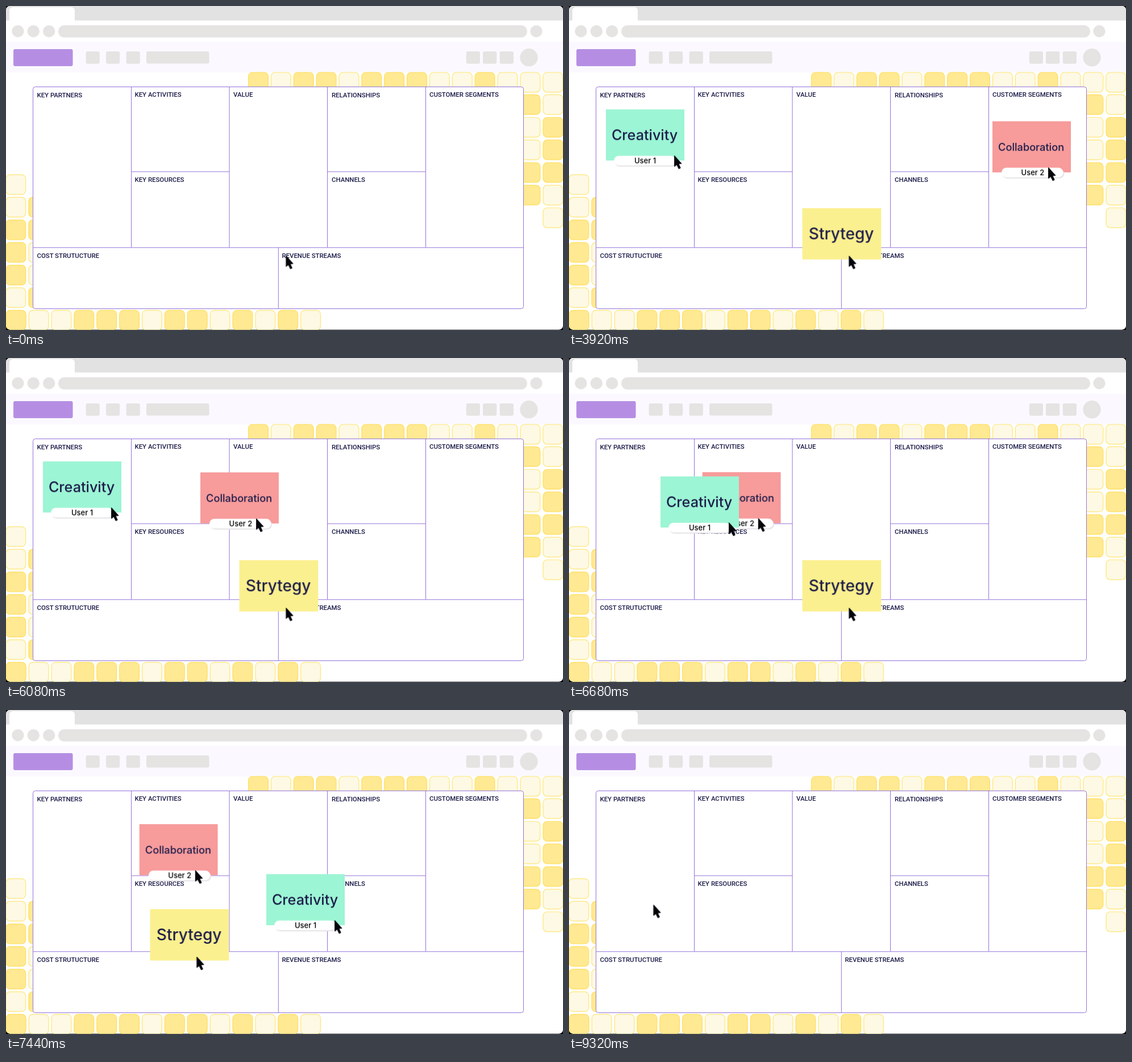
Animation of 980x571 px, one loop 9920 ms. Source, as an HTML page:

```html
<!DOCTYPE html>
<html lang="en">
<head>
<meta charset="utf-8">
<title>Canvas collaboration</title>
<style>
  html, body { margin: 0; width: 100%; height: 100%; overflow: hidden; background: #000; }
  svg { display: block; width: 980px; height: 571px; }
  .chrome { fill: #e6e3e3; }
  .lines { fill: none; stroke: #9473da; stroke-width: 1; }
  .heads { font: 500 11.4px Roboto, sans-serif; fill: #1b1b49; }
  .word { font-family: Inter, sans-serif; font-weight: 500; fill: #1b1b49; text-anchor: middle; }
  .user { font: 500 13px Inter, sans-serif; fill: #000; text-anchor: middle; }
</style>
</head>
<body>
<svg viewBox="0 0 980 571">
  <defs>
    <clipPath id="win"><rect width="980" height="570.4" rx="7"/></clipPath>
    <path id="cursor" d="M.6.6V19.6L4.6 16.4L8.2 23.6L11.2 22.2L7.9 14.9L13 14.4Z"
      fill="#05050c" stroke="#05050c" stroke-width="1" stroke-linejoin="round"/>
  </defs>
  <g clip-path="url(#win)">
    <rect width="980" height="571" fill="#fff"/>
    <rect width="980" height="25.5" fill="#e2e2e2"/>
    <path d="M6 26V8a6 6 0 0 1 6-6H115a6 6 0 0 1 6 6V26Z" fill="#fff"/>
    <rect y="62.5" width="980" height="54.5" fill="#fbf9ff"/>
    <g class="chrome" id="chrome">
      <rect x="92" y="34" width="825" height="21.5" rx="10.5"/>
      <rect x="247" y="80" width="110.5" height="21.5" rx="3"/>
      <circle cx="920" cy="90.8" r="15.7"/>
    </g>
    <rect x="13" y="76" width="104.5" height="30" rx="3" fill="#b58ee3"/>
    <g id="tiles" stroke-width="1.2"></g>
    <rect x="47.5" y="142.5" width="863" height="391" rx="4" fill="#fff"/>
    <path class="lines" d="M220.5 142.5V425.5M393 142.5V425.5M565.5 142.5V425.5M738.5 142.5V425.5
      M47.5 425.8H910.5M479.3 425.5V533.5M220.5 292H393M565.5 292H738.5"/>
    <rect class="lines" x="47.5" y="142.5" width="863" height="391" rx="4"/>
    <g class="heads" id="heads"></g>
    <g id="notes"></g>
  </g>
</svg>
<script>
const LOOP = 9920, FRAME = 40;
const $ = id => document.getElementById(id);

function add(parent, tag, attrs, text) {
  const el = document.createElementNS('http://www.w3.org/2000/svg', tag);
  for (const k in attrs) el.setAttribute(k, attrs[k]);
  if (text) el.textContent = text;
  return parent.appendChild(el);
}

// Browser buttons
for (const cx of [21, 48.3, 75.7, 933]) add($('chrome'), 'circle', { cx, cy: 44.6, r: 10.6 });
for (const x of [140.5, 176, 211.5, 809.7, 839, 868.7])
  add($('chrome'), 'rect', { x, y: 80, width: 24.3, height: 21.7, rx: 3 });

// Tile runs: D = deep, L = light
function tiles(x, y, dx, dy, run) {
  [...run].forEach((c, i) => add($('tiles'), 'rect', {
    x: x + dx * i, y: y + dy * i, width: 34.8, height: 34.8, rx: 7,
    fill: c === 'D' ? '#ffe992' : '#fdf9e4',
    stroke: c === 'D' ? '#ffde5c' : '#ffe676'
  }));
}
const PITCH = 39.87;
tiles(426.5, 117, PITCH, 0, 'DLDDLDDDLLDLLL');
tiles(905, 156.4, 0, PITCH, 'DLLDD');
tiles(945, 156.4, 0, PITCH, 'LDDDLL');
tiles(-.1, 297.3, 0, PITCH, 'LLDDDL');
tiles(39.9, 337.2, 0, PITCH, 'DDLLD');
tiles(.3, 536.3, PITCH, 0, 'DLLDDDLDDLDLDL');

const heads = [
  ['KEY PARTNERS', 54.5, 161], ['KEY ACTIVITIES', 226.5, 160], ['VALUE', 400, 160],
  ['RELATIONSHIPS', 573, 161], ['CUSTOMER SEGMENTS', 745, 160],
  ['KEY RESOURCES', 226.5, 310], ['CHANNELS', 573, 310],
  ['COST STRUTUCTURE', 54.5, 444], ['REVENUE STREAMS', 485.5, 444]
];
for (const [text, x, y] of heads) add($('heads'), 'text', { x, y }, text);

// path: [ms, dx, dy] waypoints, advanced once per 40 ms
const notes = [
  { x: 745, y: 203.2, w: 138, h: 90, fill: '#f79b9b', word: 'Collaboration', size: 18.2, base: 52,
    user: 'User 2', pill: 16, cursor: [98, 81], show: 1600, type: 3160, hide: 8480,
    path: [[5000, 0, 0], [5440, -158, -.7], [6360, -510.3, -2]] },
  { x: 65, y: 182.3, w: 138, h: 90, fill: '#9cf5d4', word: 'Creativity', size: 25.2, base: 54.3,
    user: 'User 1', pill: 14, cursor: [120, 81], show: 1080, type: 2440, hide: 8720,
    path: [[6440, 0, 0], [6680, 96, 26.4], [7440, 393, 107], [7760, 510, 139.5]] },
  { x: 410.5, y: 356.3, w: 139, h: 90.5, fill: '#fbf08f', word: 'Strytegy', size: 28, base: 54.5,
    cursor: [81.7, 83.4], show: 600, type: 3920, hide: 9320,
    path: [[6840, 0, 0], [7160, -76, 2], [7440, -157, -5.3], [7640, -210, -24],
      [7840, -264, -60], [8000, -308, -86], [8120, -344, -97]] }
];

function play(el, frames) {
  el.animate(frames, { duration: LOOP, iterations: Infinity });
}

function showBetween(el, from, to) {
  play(el, [[0, 0], [from, 1], [to, 0], [LOOP, 0]].map(([ms, opacity]) =>
    ({ offset: ms / LOOP, opacity, easing: 'step-end' })));
}

function move(el, path) {
  const last = path[path.length - 1];
  const stops = [[0, 0, 0], ...path, [LOOP, last[1], last[2]]];
  play(el, stops.map(([ms, x, y], i) => {
    const next = stops[i + 1];
    const steps = next ? (next[0] - ms) / FRAME : 1;
    return { offset: ms / LOOP, transform: `translate(${x}px, ${y}px)`, easing: `steps(${steps}, end)` };
  }));
}

for (const n of notes) {
  const place = add($('notes'), 'g', { transform: `translate(${n.x} ${n.y})` });
  const mover = add(place, 'g', {});
  const card = add(mover, 'g', {});
  add(card, 'rect', { width: n.w, height: n.h, fill: n.fill });
  const word = add(card, 'text', { class: 'word', x: n.w / 2 - .9, y: n.base, 'font-size': n.size }, n.word);
  if (n.user) {
    const pill = { x: n.pill, y: 81.7, width: 108.5, height: 17, rx: 8.5 };
    add(card, 'rect', { ...pill, x: n.pill + 1.5, y: 83.7, fill: '#e6e3e6' });
    add(card, 'rect', { ...pill, fill: '#fff' });
    add(card, 'text', { class: 'user', x: n.pill + 55, y: 94.5 }, n.user);
  }
  const [cx, cy] = n.cursor;
  add(n.user ? card : mover, 'use', { href: '#cursor', x: cx, y: cy });
  showBetween(card, n.show, n.hide);
  showBetween(word, n.type, n.hide);
  move(mover, n.path);
}
</script>
</body>
</html>
```
